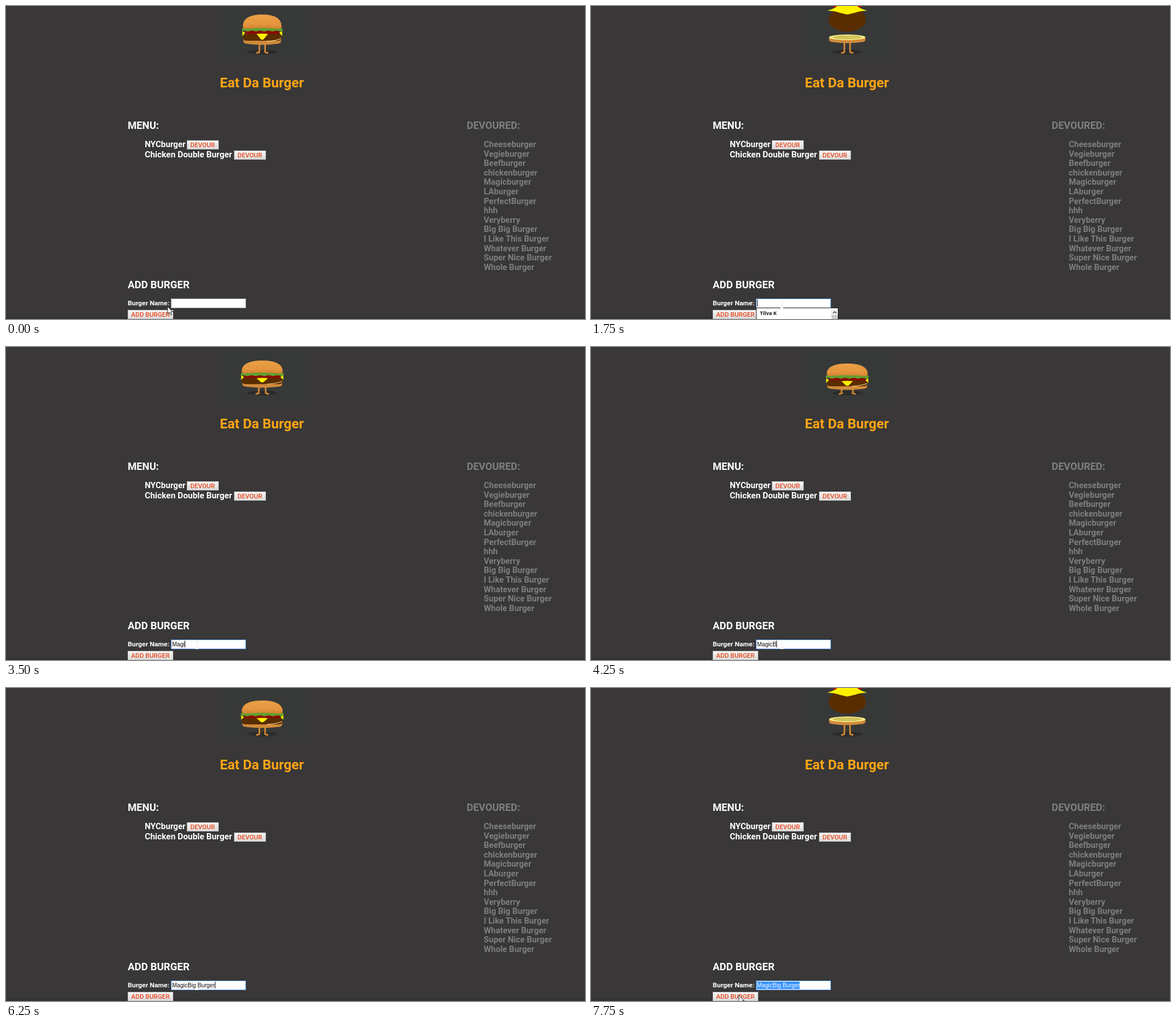
An HTML page for the animation above (8 s loop, 1018x550 px).

```html
<!DOCTYPE html>
<html lang="en">
<head>
<meta charset="utf-8">
<title>Burger menu</title>
<style>
  html, body { margin: 0; width: 100%; height: 100%; overflow: hidden; background: #393737; }
  svg { display: block; width: 100%; height: 100%; font-family: Roboto, "Liberation Sans", sans-serif; }
  text { white-space: pre; }
  .bold { font-weight: 700; }
  .button { font-weight: 500; }
  .field { font-family: "Liberation Sans", Arial, sans-serif; }
  .hint { font-family: "Open Sans", sans-serif; font-weight: 700; }
</style>
</head>
<body>
<svg viewBox="0 0 1018 550">
  <defs>
    <linearGradient id="face" x2="0" y2="1">
      <stop stop-color="#f6f6f6"/><stop offset="1" stop-color="#dadada"/>
    </linearGradient>
    <linearGradient id="crust" x2="0" y2="1">
      <stop stop-color="#eba045"/><stop offset=".7" stop-color="#e4933c"/><stop offset="1" stop-color="#cf8232"/>
    </linearGradient>
  </defs>
  <g id="page"></g>
  <g id="burger"></g>
  <g id="form"></g>
</svg>
<script>
const STEP = 250, LOOP = 8000, POSES = 12;
const $ = id => document.getElementById(id);

const rect = (x, y, w, h, fill, more = '') =>
  `<rect x="${x}" y="${y}" width="${w}" height="${h}" fill="${fill}" ${more}/>`;
const label = (x, y, size, fill, str, cls = 'bold') =>
  `<text x="${x}" y="${y}" font-size="${size}" fill="${fill}" class="${cls}">${str}</text>`;
const path = (d, fill, more = '') => `<path d="${d}" fill="${fill}" ${more}/>`;
const oval = (x, y, rx, ry, fill) =>
  `<ellipse cx="${x}" cy="${y}" rx="${rx}" ry="${ry}" fill="${fill}"/>`;
const button = (x, y, w, str) =>
  rect(x + .5, y + .5, w - 1, 15, 'url(#face)', 'stroke="#c4c4c4"') +
  label(x + 6, y + 12, 11.3, '#e8481c', str, 'button');

const devoured = ['Cheeseburger', 'Vegieburger', 'Beefburger', 'chickenburger', 'Magicburger',
  'LAburger', 'PerfectBurger', 'hhh', 'Veryberry', 'Big Big Burger', 'I Like This Burger',
  'Whatever Burger', 'Super Nice Burger', 'Whole Burger'];

$('page').innerHTML =
  rect(0, 547, 1018, 3, '#323131') +
  rect(375, 0, 150, 96, '#373938') +
  label(376, 143, 24, '#ffa514', 'Eat Da Burger') +
  label(214, 215.5, 17.8, '#fff', 'MENU:') +
  label(244, 248, 14.6, '#fff', 'NYCburger') + button(318, 236, 56, 'DEVOUR') +
  label(244, 266, 14.9, '#fff', 'Chicken Double Burger') + button(401, 254, 56, 'DEVOUR') +
  label(810, 215.5, 17.6, '#7f7e7e', 'DEVOURED:') +
  devoured.map((name, i) => label(840, 248 + i * 16.6, 14.6, '#7f7e7e', name)).join('') +
  label(214, 496, 18, '#fff', 'ADD BURGER') +
  label(214, 526, 11.8, '#fff', 'Burger Name:') +
  button(214, 534, 80, 'ADD BURGER');

// pose: [bun top, lettuce, tomato, cheese, cheese drop, patty, patty half height, base, leg bow, half width]
const keys = {
  0: [15, 42, 47, 49, 10, 55, 6, 58, 0, 34],
  1: [22, 47, 51, 53, 7, 58, 6, 60, 0, 36],
  5: [29, 53, 57, 60, 8, 63, 6, 65, 4, 36],
  6: [-8, 18, 26, 30, 10, 42, 10, 56, 0, 34],
  7: [-70, -30, 0, 2, 13, 24, 21, 55, 0, 33],
  8: [-30, 0, 14, 18, 8, 34, 14, 56, 0, 33],
  9: [20, 45, 50, 53, -5, 57, 6, 60, 1, 35],
  10: [18, 44, 49, 53, -8, 56, 6, 58, 0, 34],
  11: [15, 42, 47, 48, 5, 55, 6, 57, 2, 34]
};

function poseAt(i) {
  if (keys[i]) return keys[i];
  const k = (i - 1) / 4;
  return keys[1].map((v, j) => v + (keys[5][j] - v) * k);
}

function lettuce(y, w) {
  let d = `M${-w - 1} ${y - 3}Q0 ${y - 6} ${w + 1} ${y - 3}L${w + 2} ${y + 1}`;
  for (let i = 1, n = 10; i <= n; i++) {
    const x = w + 2 - i * (2 * w + 4) / n;
    d += `Q${x + w / n} ${y + (i % 2 ? 4 : 1)} ${x} ${y + 1.5}`;
  }
  return path(d + 'Z', '#62a02f');
}

function seeds(top, w) {
  let out = '';
  for (let i = 0; i < 17; i++) {
    const x = (i / 8 - 1) * w * .75;
    out += oval(x, top + 4 + x * x / 80 + (i * 5 % 4) * 2.4, .8, .5, '#f2bf74');
  }
  return out;
}

function cheese(y, drop, w, loose) {
  if (loose) return path(`M${-w - 2} ${y + 6}Q-22 ${y + 3} -15 ${y - 4}H15Q22 ${y + 3} ${w + 2} ${y + 6}
    Q20 ${y + 7} 13 ${y + 10}L0 ${y + drop}L-13 ${y + 10}Q-20 ${y + 7} ${-w - 2} ${y + 6}Z`, '#fff200');
  let out = path(`M-10 ${y}Q0 ${y - 1} 10 ${y}L2 ${y + drop}H-2Z`, '#fff200');
  if (drop > 0) for (const s of [-1, 1])
    out += path(`M${s * (w - 4)} ${y - 2}L${s * (w + 1)} ${y - 5}V${y + drop * .4}Z`, '#fff200');
  return out;
}

function burger(i) {
  const [top, leaf, tomato, slice, drop, patty, ph, base, bow, w] = poseAt(i);
  const loose = i > 5 && i < 9, bun = leaf - 2, b = w - 1;
  const open = Math.min(5, Math.max(1.5, (base - patty - ph) / 2));
  let out = oval(0, 81, 27, 4, '#2b2b29');
  for (const s of [-1, 1])
    out += path(`M${s * 5} ${base + 8}Q${s * (5 + 2 * bow)} 75 ${s * (5 + bow)} 81L${s * (9.5 + bow)} 82.5`, 'none',
      'stroke="#c98235" stroke-width="3" stroke-linecap="round" stroke-linejoin="round"');
  out += path(`M${-b} ${base}H${b}V${base + 4}Q${b} ${base + 8} ${b - 7} ${base + 8.5}
    Q0 ${base + 12} ${7 - b} ${base + 8.5}Q${-b} ${base + 8} ${-b} ${base + 4}Z`, '#d18a3a');
  out += oval(0, base, b, open, '#fbee8c');
  if (open > 3) out += oval(0, base, b - 6, open - 1.5, '#cfc45e');
  out += rect(-w, patty - ph, 2 * w, 2 * ph, '#5a2d00', `rx="${loose ? w : 6}" ry="${ph}"`);
  if (!loose) out += path(`M8 ${base + 4}Q26 ${base + 3} ${b} ${base - 1}`, 'none', 'stroke="#f6dc90" stroke-width="1.2"');
  out += loose ? oval(0, tomato, w * .78, 5, '#b8140c')
    : rect(4 - w, tomato - 3, 2 * w - 8, 5, '#8c0a04', 'rx="2.5"');
  out += lettuce(leaf, w) + cheese(slice, drop, w, loose);
  out += path(`M${-w} ${bun - 4}C${-w} ${top + 5} ${-w * .55} ${top} 0 ${top}S${w} ${top + 5} ${w} ${bun - 4}
    Q${w} ${bun} ${w - 5} ${bun}Q0 ${bun - 3} ${5 - w} ${bun}Q${-w} ${bun} ${-w} ${bun - 4}Z`, 'url(#crust)');
  out += seeds(top, w);
  if (i === 11) for (let n = 0; n < 10; n++) {
    const k = n >> 1, x = (n % 2 ? 1 : -1) * (46 + k % 2 * 8);
    out += rect(x, 27 + k * 9, 2, 1.5, '#858043');
  }
  return `<g transform="translate(450.5 0)">${out}</g>`;
}

// [step, letters typed by then]
const phrase = 'MagicBig Burger';
const typing = [[11, 1], [12, 2], [13, 3], [14, 4], [16, 5], [17, 6], [18, 7], [19, 8], [20, 9],
  [21, 11], [22, 13], [23, 14], [24, 15]];
const typedAt = i => phrase.slice(0, typing.reduce((n, [at, len]) => i >= at ? len : n, 0));

function popup(i) {
  const first = i >= 5 && i < 11;
  if (!first && i !== 11) return '';
  const w = first ? 145 : 132;
  let out = rect(290.5, 530.5, w - 1, first ? 22 : 18, '#fff', 'stroke="#1c1c1c"') +
    label(297, 543, 9, '#111', first ? 'Tilva K' : 'MEP', 'hint');
  if (first) out += rect(422, 531, 12, 19, '#f0f0f0') + rect(423, 543, 11, 7, '#c9c9c9') +
    path('M425.5 540L428.5 537L431.5 540', 'none', 'stroke="#444" stroke-width="1.5"');
  return out;
}

function pointer(i) {
  const arrow = (x, y) => path('M0 0V13L3 10.2L5.2 15L7.4 14L5.3 9.4H9.3Z', '#fff',
    `stroke="#111" stroke-width=".9" transform="translate(${x} ${y})"`);
  const beam = (x, y) => path(`M${x} ${y - 8}V${y + 6}M${x - 3} ${y + 6.5}H${x + 2}`, 'none', 'stroke="#e6e6e6"');
  if (i < 2) return arrow(284 - i * 4, 528);
  if (i < 4) return beam(280 + i * 15, 524);
  if (i < 27) return beam(336, 524);
  if (i < 30) return beam(366 - (i - 27) * 34, 523);
  return arrow(260 + (31 - i) * 10, 540 - (31 - i) * 5);
}

function form(i) {
  const focus = i >= 4, selected = i >= 28;
  $('form').innerHTML =
    rect(290.5, 514.5, 131, 16, '#fff', `stroke="${focus ? '#4f8fdc' : '#a8a8a8'}"`) +
    '<g id="mark"></g>' +
    label(292, 526, 10.2, selected ? '#fff' : '#111', typedAt(i), 'field') +
    popup(i) + pointer(i);
  const width = document.querySelector('.field').getComputedTextLength();
  const caret = focus && (i >= 11 || (i >> 1) % 2);
  if (selected) $('mark').innerHTML = rect(291.5, 516, width, 13, '#3390ff');
  else if (caret) $('mark').innerHTML = rect(292 + width, 516, 1, 12, '#111');
}

let shown = -1;
function draw() {
  const i = Math.floor(performance.now() % LOOP / STEP);
  if (i !== shown) {
    shown = i;
    $('burger').innerHTML = burger(i % POSES);
    form(i);
  }
  requestAnimationFrame(draw);
}
draw();
</script>
</body>
</html>
```
